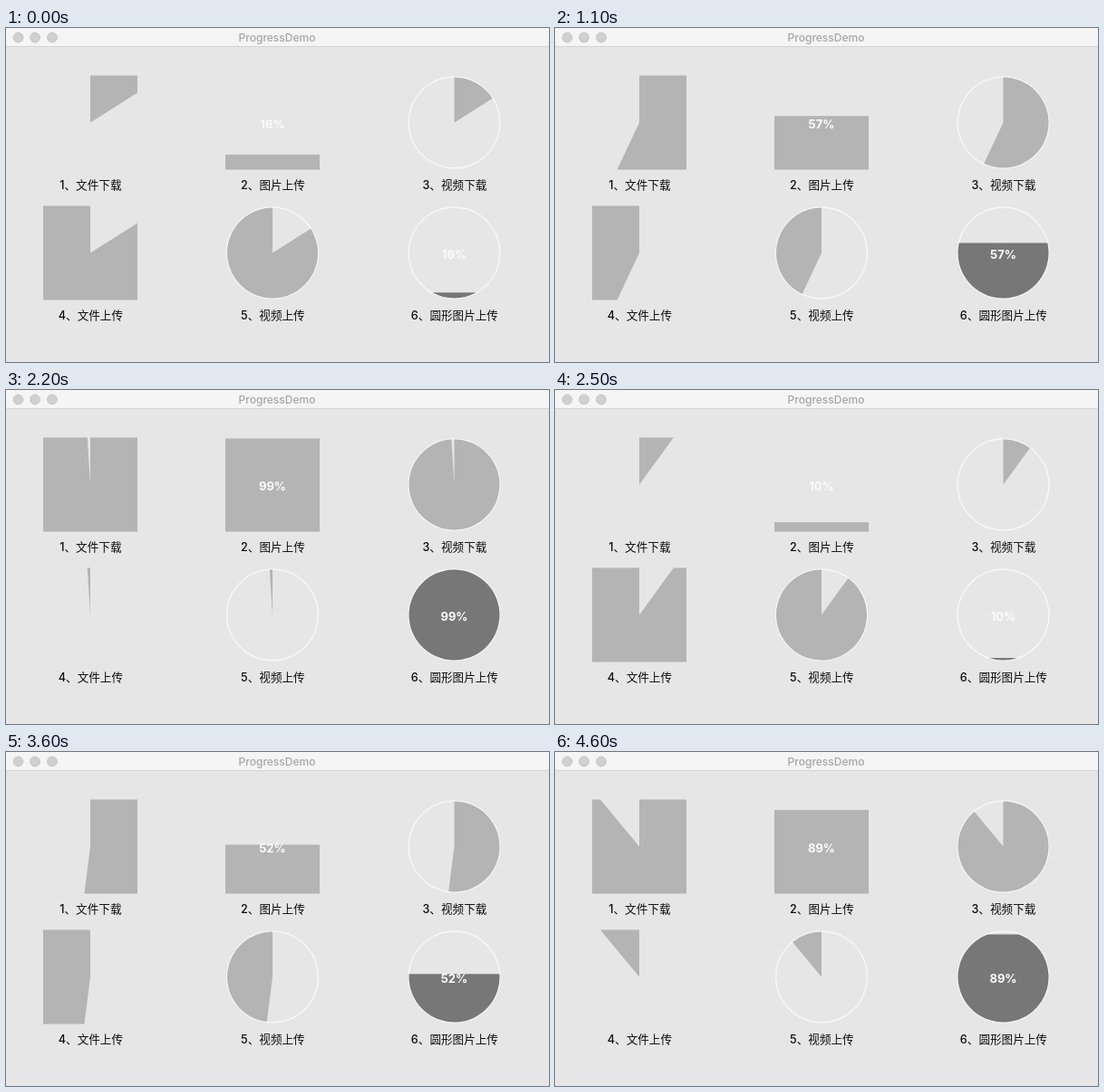
These frames come from a looping animation (599 px wide and 369 px high, 4700 ms). An HTML page with a canvas:

```html
<!DOCTYPE html>
<html lang="zh-CN">
<head>
<meta charset="utf-8">
<title>ProgressDemo</title>
<style>
html, body { margin: 0; width: 100%; height: 100%; overflow: hidden; background: #e6e6e6; }
canvas { display: block; width: 599px; height: 369px; }
</style>
</head>
<body>
<canvas id="stage" width="599" height="369"></canvas>
<script>
const W = 599, H = 369, LOOP = 4700, STEP = 100;
const canvas = document.getElementById('stage');
const ctx = canvas.getContext('2d');
const dpr = window.devicePixelRatio || 1;
canvas.width = Math.round(W * dpr);
canvas.height = Math.round(H * dpr);
ctx.scale(dpr, dpr);

const FONT = 'Inter, "Noto Sans CJK SC", "Noto Sans CJK", sans-serif';
const FILL = '#b4b4b4', DARK = '#777777';
const COLS = [93, 294, 494.5], ROWS = [104.5, 248.5];
const HALF = 52, R = 50;
const LABELS = ['文件下载', '图片上传', '视频下载', '文件上传', '视频上传', '圆形图片上传'];
// step index, accumulated percent
const KNOTS = [[0, 16], [7, 41], [15, 73], [22, 99], [30, 129], [36, 152], [46, 189]];

function percentAt(ms) {
  const step = Math.floor((ms % LOOP) / STEP);
  let i = 0;
  while (i < KNOTS.length - 2 && step > KNOTS[i + 1][0]) i++;
  const [s0, v0] = KNOTS[i], [s1, v1] = KNOTS[i + 1];
  return Math.round(v0 + (v1 - v0) * (step - s0) / (s1 - s0)) % 100;
}

function text(str, x, y, font, color) {
  ctx.font = font + ' ' + FONT;
  ctx.fillStyle = color;
  ctx.textAlign = 'center';
  ctx.fillText(str, x, y);
}

function wedge(x, y, r, from, to) {
  const top = -Math.PI / 2, turn = Math.PI * 2;
  ctx.fillStyle = FILL;
  ctx.beginPath();
  ctx.moveTo(x, y);
  ctx.arc(x, y, r, top + from * turn, top + to * turn);
  ctx.closePath();
  ctx.fill();
}

function squareWedge(x, y, from, to) {
  ctx.save();
  ctx.beginPath();
  ctx.rect(x - HALF, y - HALF, HALF * 2, HALF * 2);
  ctx.clip();
  wedge(x, y, HALF * 2, from, to);
  ctx.restore();
}

function ring(x, y) {
  ctx.strokeStyle = '#f9f9f9';
  ctx.lineWidth = 1.3;
  ctx.beginPath();
  ctx.arc(x, y, R + 0.3, 0, Math.PI * 2);
  ctx.stroke();
}

function pie(x, y, from, to) {
  ring(x, y);
  wedge(x, y, R, from, to);
}

function percentText(x, y, pct) {
  text(pct + '%', x, y + 6, '700 13px', '#fbfbfb');
}

function fillBox(x, y, pct) {
  const h = HALF * 2 * pct / 100;
  ctx.fillStyle = FILL;
  ctx.fillRect(x - HALF, y + HALF - h, HALF * 2, h);
  percentText(x, y, pct);
}

function fillCircle(x, y, pct) {
  const a = Math.PI * pct / 100;
  ring(x, y);
  ctx.fillStyle = DARK;
  ctx.beginPath();
  ctx.arc(x, y, R, Math.PI / 2 - a, Math.PI / 2 + a);
  ctx.fill();
  percentText(x, y, pct);
}

function drawWindow() {
  ctx.fillStyle = '#e6e6e6';
  ctx.fillRect(0, 0, W, H);
  ctx.fillStyle = '#f5f5f5';
  ctx.fillRect(0, 0, W, 20);
  ctx.fillStyle = '#d4d4d4';
  ctx.fillRect(0, 20, W, 1);
  ctx.lineWidth = 1;
  for (const x of [13.5, 32, 51]) {
    ctx.beginPath();
    ctx.arc(x, 10.5, 5.4, 0, Math.PI * 2);
    ctx.fillStyle = '#d0d0d0';
    ctx.fill();
    ctx.strokeStyle = '#c6c6c6';
    ctx.stroke();
  }
  text('ProgressDemo', 299, 15, '500 12px', '#a6a6a6');
}

function draw(ms) {
  const pct = percentAt(ms), p = pct / 100;
  const [a, b, c] = COLS, [top, low] = ROWS;
  drawWindow();
  squareWedge(a, top, 0, p);
  fillBox(b, top, pct);
  pie(c, top, 0, p);
  squareWedge(a, low, p, 1);
  pie(b, low, p, 1);
  fillCircle(c, low, pct);
  LABELS.forEach((label, i) => {
    text(`${i + 1}、${label}`, COLS[i % 3] + 0.4, ROWS[Math.floor(i / 3)] + 73.5, '500 12.6px', '#0c0c0c');
  });
}

const start = performance.now();
function tick() {
  draw(performance.now() - start);
  requestAnimationFrame(tick);
}
tick();
</script>
</body>
</html>
```
